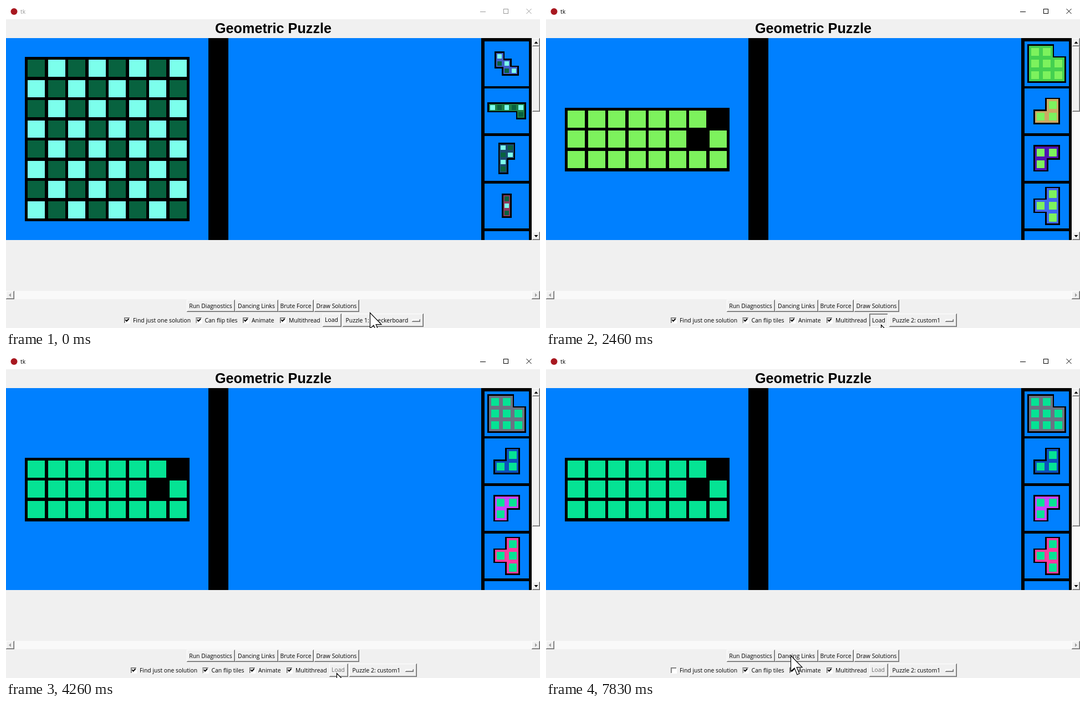
An HTML page with a canvas for the animation above (8 s loop, 963 px wide and 582 px high).

```html
<!DOCTYPE html>
<html lang="en">
<head>
<meta charset="utf-8">
<title>Geometric Puzzle</title>
<style>
  html, body { margin: 0; width: 100%; height: 100%; overflow: hidden; background: #f0f0f0; }
  canvas { display: block; }
</style>
</head>
<body>
<canvas id="stage" width="963" height="582"></canvas>
<script>
const ctx = document.getElementById('stage').getContext('2d');
const LOOP = 8000, TICK = 30;
const BLUE = '#0080ff', FACE = '#f0f0f0', TROUGH = '#f9f9f9';
const UI_FONT = '10.4px "Open Sans", "Noto Sans", sans-serif';

// Piece maps: L light, D dark, # plain square, . empty
const checker = {
  cols: 8, rows: 8, top: 92, unit: 64 / 5, thumbEnd: 191,
  holes: [],
  pieces: [['L..', 'DL.', '.DL'], ['LDLDL', '....D'], ['LD', 'DL', 'L.', 'D.'], ['D', 'L', 'D']]
};
const custom = {
  cols: 8, rows: 3, top: 183.5, unit: 64 / 3, thumbEnd: 308,
  holes: ['7,0', '6,1'],
  pieces: [['##.', '###', '###'], ['.#', '##'], ['##', '#.'], ['.#', '##', '.#']]
};

const looks = [
  { from: 0, puzzle: checker, light: '#7cffec', dark: '#08623f', fills: ['#4060c8', '#1c8048', '#1c4a70', '#8c3a5c'] },
  { from: 2460, puzzle: custom, light: '#7df25d', fills: ['#44d050', '#cda963', '#5012b4', '#3f66f0'] },
  { from: 3330, puzzle: custom, light: '#5f5050', fills: ['#ad9fb3', '#a0692a', '#fffac0', '#52c985'] },
  { from: 3810, puzzle: custom, light: '#6f9068', fills: ['#ad9fb3', '#6a6a80', '#d8a0d0', '#a8808c'] },
  { from: 4260, puzzle: custom, light: '#05e394', fills: ['#6b7283', '#0c50be', '#cc44ff', '#ff3c9e'] }
];

const presses = [[2430, 2490], [3270, 3360], [3720, 3810], [4200, 4260]];

// Pointer moves: start, end, from x, y, to x, y
const moves = [
  [30, 150, 656, 554, 652, 564],
  [1110, 1260, 652, 564, 656, 584],
  [2040, 2250, 612, 584, 604, 576],
  [3060, 3120, 604, 576, 596, 573],
  [4890, 5460, 596, 573, 525, 568],
  [5580, 5700, 525, 568, 374, 567],
  [5820, 5940, 374, 567, 336, 568],
  [5940, 6060, 336, 568, 322, 566],
  [6480, 6990, 322, 566, 451, 552],
  [7140, 7470, 451, 552, 446, 545],
  [7680, 7830, 446, 545, 441, 541]
];

function rect(x, y, w, h, color) {
  ctx.fillStyle = color;
  ctx.fillRect(x, y, w, h);
}

function poly(points, color) {
  ctx.beginPath();
  points.forEach(([x, y]) => ctx.lineTo(x, y));
  ctx.closePath();
  ctx.fillStyle = color;
  ctx.fill();
}

function label(text, x, y, color = '#000', align = 'left', font = UI_FONT) {
  ctx.font = font;
  ctx.textAlign = align;
  ctx.fillStyle = color;
  ctx.fillText(text, x, y);
}

function bevel(x, y, w, h, sunken = false, face = FACE) {
  rect(x, y, w, h, face);
  const lit = '#fff', outer = '#696969', inner = '#a0a0a0';
  rect(x, y, w, 1, sunken ? outer : lit);
  rect(x, y, 1, h, sunken ? outer : lit);
  rect(x, y + h - 1, w, 1, sunken ? lit : outer);
  rect(x + w - 1, y, 1, h, sunken ? lit : outer);
  if (sunken) {
    rect(x + 1, y + 1, w - 2, 1, inner);
    rect(x + 1, y + 1, 1, h - 2, inner);
  } else {
    rect(x + 1, y + h - 2, w - 2, 1, inner);
    rect(x + w - 2, y + 1, 1, h - 2, inner);
  }
}

function arrow(x, y, dx, dy, color) {
  poly([[x + dx * 2, y + dy * 2],
        [x - dx * 2 + dy * 3.5, y - dy * 2 + dx * 3.5],
        [x - dx * 2 - dy * 3.5, y - dy * 2 - dx * 3.5]], color);
}

function drawTitleBar(active) {
  const ink = active ? '#000' : '#999';
  rect(0, 0, 963, 24, '#fff');
  ctx.beginPath();
  ctx.arc(14.5, 10, 6, 0, Math.PI * 2);
  ctx.fillStyle = '#a81820';
  ctx.fill();
  label('tk', 26, 13.5, ink);
  rect(855, 10, 10, 1, ink);
  ctx.strokeStyle = ink;
  ctx.lineWidth = 1;
  ctx.strokeRect(897.5, 5.5, 8, 8);
  ctx.beginPath();
  ctx.moveTo(938.5, 5); ctx.lineTo(947.5, 14);
  ctx.moveTo(947.5, 5); ctx.lineTo(938.5, 14);
  ctx.stroke();
}

function drawBoard({ puzzle, light, dark }) {
  const { cols, rows, top, holes } = puzzle;
  rect(34, Math.round(top), 297, Math.round(rows * 36.5 + 5), '#000');
  for (let r = 0; r < rows; r++) {
    for (let c = 0; c < cols; c++) {
      if (holes.includes(c + ',' + r)) continue;
      const color = dark && (r + c) % 2 === 0 ? dark : light;
      rect(Math.round(39 + c * 36.5), Math.round(top + 5 + r * 36.5), 31, 31, color);
    }
  }
}

function drawPiece(map, cy, fill, { puzzle, light, dark }) {
  const u = puzzle.unit, edge = 2.6, inset = u / 6;
  const x0 = 903 - map[0].length * u / 2, y0 = cy - map.length * u / 2;
  const each = (grow, colorOf) => map.forEach((row, r) => [...row].forEach((kind, c) => {
    if (kind === '.') return;
    const x = Math.round(x0 + c * u - grow), y = Math.round(y0 + r * u - grow);
    const right = Math.round(x0 + (c + 1) * u + grow), bottom = Math.round(y0 + (r + 1) * u + grow);
    rect(x, y, right - x, bottom - y, colorOf(kind));
  }));
  each(edge, () => '#000');
  each(0, () => fill);
  each(-inset, kind => kind === 'D' ? dark : light);
}

function drawCanvas(look, thumbEnd) {
  rect(0, 58, 963, 365, BLUE);
  rect(365, 58, 36, 365, '#000');
  drawBoard(look);

  rect(857, 58, 91, 365, '#000');
  for (let i = 0; i < 5; i++) {
    const y = Math.round(63.7 + i * 85.7);
    rect(863, y, 80, Math.min(81, 423 - y), BLUE);
  }
  look.puzzle.pieces.forEach((map, i) => drawPiece(map, 104 + i * 85.7, look.fills[i], look));

  rect(948, 58, 15, 365, TROUGH);
  bevel(949, 58, 14, 15);
  bevel(949, 73, 14, thumbEnd - 73);
  bevel(949, 408, 14, 15);
  arrow(956, 66, 0, -1, '#000');
  arrow(956, 416, 0, 1, '#000');
}

function drawBottomScroll() {
  rect(0, 515, 963, 15, TROUGH);
  bevel(0, 515, 15, 15);
  bevel(948, 515, 15, 15);
  arrow(7, 522.5, -1, 0, '#a0a0a0');
  arrow(956, 522.5, 1, 0, '#a0a0a0');
}

function button(text, x, w) {
  bevel(x, 531, w, 22);
  label(text, x + w / 2 - 0.5, 545.5, '#000', 'center');
}

function checkbox(text, x, checked) {
  bevel(x, 563, 11, 11, true, '#fff');
  if (checked) {
    ctx.beginPath();
    ctx.moveTo(x + 2.5, 567);
    ctx.lineTo(x + 4.5, 569.5);
    ctx.lineTo(x + 8.5, 565.5);
    ctx.strokeStyle = '#000';
    ctx.lineWidth = 2;
    ctx.stroke();
  }
  label(text, x + 16, 572);
}

function drawControls(t) {
  button('Run Diagnostics', 326, 87);
  button('Dancing Links', 413, 78);
  button('Brute Force', 491, 64);
  button('Draw Solutions', 556, 81);

  const dx = t >= 1800 ? 12 : 0;
  checkbox('Find just one solution', 213 + dx, t < 6240);
  checkbox('Can flip tiles', 342.5 + dx, true);
  checkbox('Animate', 427 + dx, true);
  checkbox('Multithread', 494 + dx, true);

  const down = presses.some(([a, b]) => t >= a && t < b);
  const push = down ? 1 : 0;
  bevel(571 + dx, 556, 34, 24, down);
  label('Load', 587 + dx + push, 571 + push, t >= 4260 ? '#6d6d6d' : '#000', 'center');

  const w = dx ? 122 : 146;
  bevel(607 + dx, 556, w, 24);
  label(t >= 1770 ? 'Puzzle 2: custom1' : 'Puzzle 1: Checkerboard', 612.5 + dx, 572);
  bevel(607 + dx + w - 21, 566, 15, 5);
}

function pointerAt(t) {
  let [, , x, y] = moves[0];
  for (const [a, b, x0, y0, x1, y1] of moves) {
    if (t < a) break;
    const p = Math.min(1, (t - a) / (b - a)), k = p * p * (3 - 2 * p);
    x = x0 + (x1 - x0) * k;
    y = y0 + (y1 - y0) * k;
  }
  return [Math.round(x), Math.round(y)];
}

function drawPointer(t) {
  const [x, y] = pointerAt(t);
  const shape = [[0.5, 0.5], [0.5, 29], [7, 23], [12, 35], [16, 33], [11.2, 21.7], [21, 21.7]];
  poly(shape.map(([px, py]) => [x + px, y + py]), '#fff');
  ctx.strokeStyle = '#000';
  ctx.lineWidth = 1.2;
  ctx.stroke();
}

function draw(time) {
  const t = Math.floor((time % LOOP) / TICK + 1e-6) * TICK;
  const look = looks.filter(l => t >= l.from).pop();
  rect(0, 0, 963, 582, FACE);
  drawTitleBar(t >= 630);
  label('Geometric Puzzle', 482, 49, '#000', 'center',
        'bold 25.2px "Liberation Sans", Arial, sans-serif');
  drawCanvas(look, t >= 2490 ? custom.thumbEnd : checker.thumbEnd);
  drawBottomScroll();
  drawControls(t);
  drawPointer(t);
}

const start = performance.now();
function loop() {
  draw(performance.now() - start);
  requestAnimationFrame(loop);
}
loop();
</script>
</body>
</html>
```
